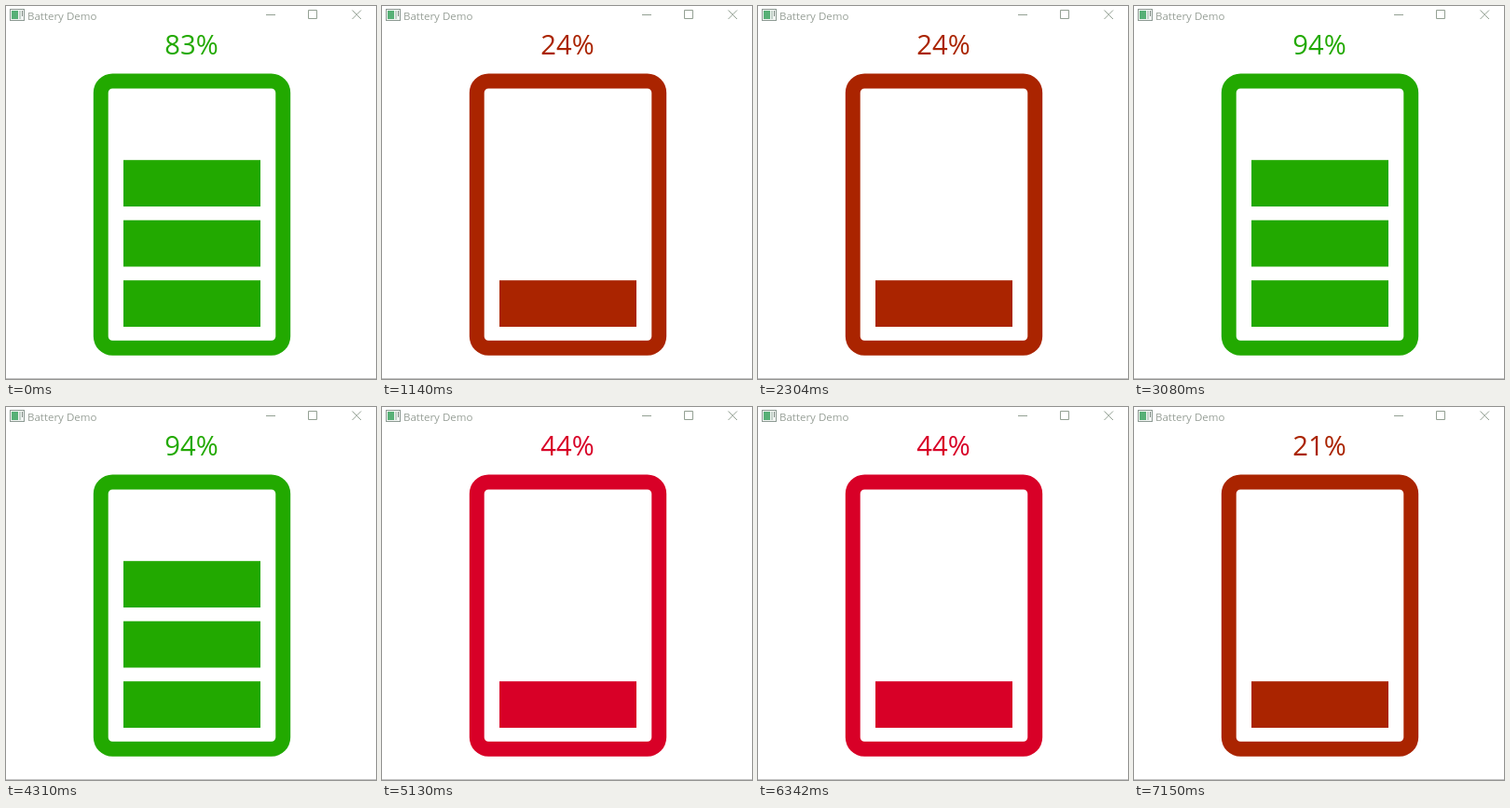
Write an HTML page with a canvas that moves like this. It is 397 px wide and 400 px high and loops after 8 s.

```html
<!DOCTYPE html>
<html lang="en">
<head>
<meta charset="utf-8">
<title>Battery Demo</title>
<style>
  html, body { margin: 0; width: 100%; height: 100%; overflow: hidden; background: #fff; }
  canvas { display: block; }
</style>
</head>
<body>
<canvas id="stage"></canvas>
<script>
const W = 397, H = 400, LOOP = 8000;
const GREEN = '#22a900', BROWN = '#aa2400', RED = '#d80027';
const states = [
  { at: 0, level: 83, bars: 3, color: GREEN },
  { at: 1140, level: 24, bars: 1, color: BROWN },
  { at: 3080, level: 94, bars: 3, color: GREEN },
  { at: 5130, level: 44, bars: 1, color: RED },
  { at: 7150, level: 21, bars: 1, color: BROWN }
];

const canvas = document.getElementById('stage');
const ctx = canvas.getContext('2d');
const ratio = window.devicePixelRatio || 1;
canvas.width = W * ratio;
canvas.height = H * ratio;
canvas.style.width = W + 'px';
canvas.style.height = H + 'px';
ctx.scale(ratio, ratio);

function rect(x, y, w, h, color) {
  ctx.fillStyle = color;
  ctx.fillRect(x, y, w, h);
}

function text(str, x, y, size, color, align) {
  ctx.font = `${size}px "Open Sans", "Noto Sans", sans-serif`;
  ctx.textAlign = align;
  ctx.fillStyle = color;
  ctx.fillText(str, x, y);
}

function drawWindow() {
  rect(0, 0, W, H, '#fff');
  rect(0, 399, W, 1, '#c4c4c4');

  // Generic application icon
  rect(4, 3, 16, 13, '#8d9a93');
  rect(5, 4, 14, 11, '#f2f5f3');
  rect(6, 5, 7, 9, '#57b076');
  rect(14, 5, 2, 9, '#c4d2ca');
  rect(17, 5, 1, 6, '#7d8982');

  text('Battery Demo', 23, 15, 11.5, '#98a098', 'left');

  ctx.strokeStyle = '#93a093';
  ctx.lineWidth = 1;
  ctx.beginPath();
  ctx.moveTo(279, 9.5);
  ctx.lineTo(289, 9.5);
  ctx.rect(324.5, 4.5, 9, 9);
  ctx.moveTo(371.5, 4.5);
  ctx.lineTo(381, 14);
  ctx.moveTo(381, 4.5);
  ctx.lineTo(371.5, 14);
  ctx.stroke();
}

function drawBattery({ level, bars, color }) {
  text(level + '%', 199, 52, 29.2, color, 'center');

  ctx.fillStyle = color;
  ctx.beginPath();
  ctx.roundRect(93.8, 72.4, 211.4, 302.4, 20.5);
  ctx.roundRect(109.7, 88.4, 179.6, 270.4, 4.5);
  ctx.fill('evenodd');

  for (let i = 0; i < bars; i++) {
    rect(126, 294.2 - i * 64.5, 147, 49.8, color);
  }
}

let start = null, shown = null;
function tick(now) {
  if (start === null) start = now;
  const t = (now - start) % LOOP;
  const state = states.filter(s => s.at <= t).pop() || states[0];
  if (state !== shown) {
    drawWindow();
    drawBattery(state);
    shown = state;
  }
  requestAnimationFrame(tick);
}
requestAnimationFrame(tick);
</script>
</body>
</html>
```
